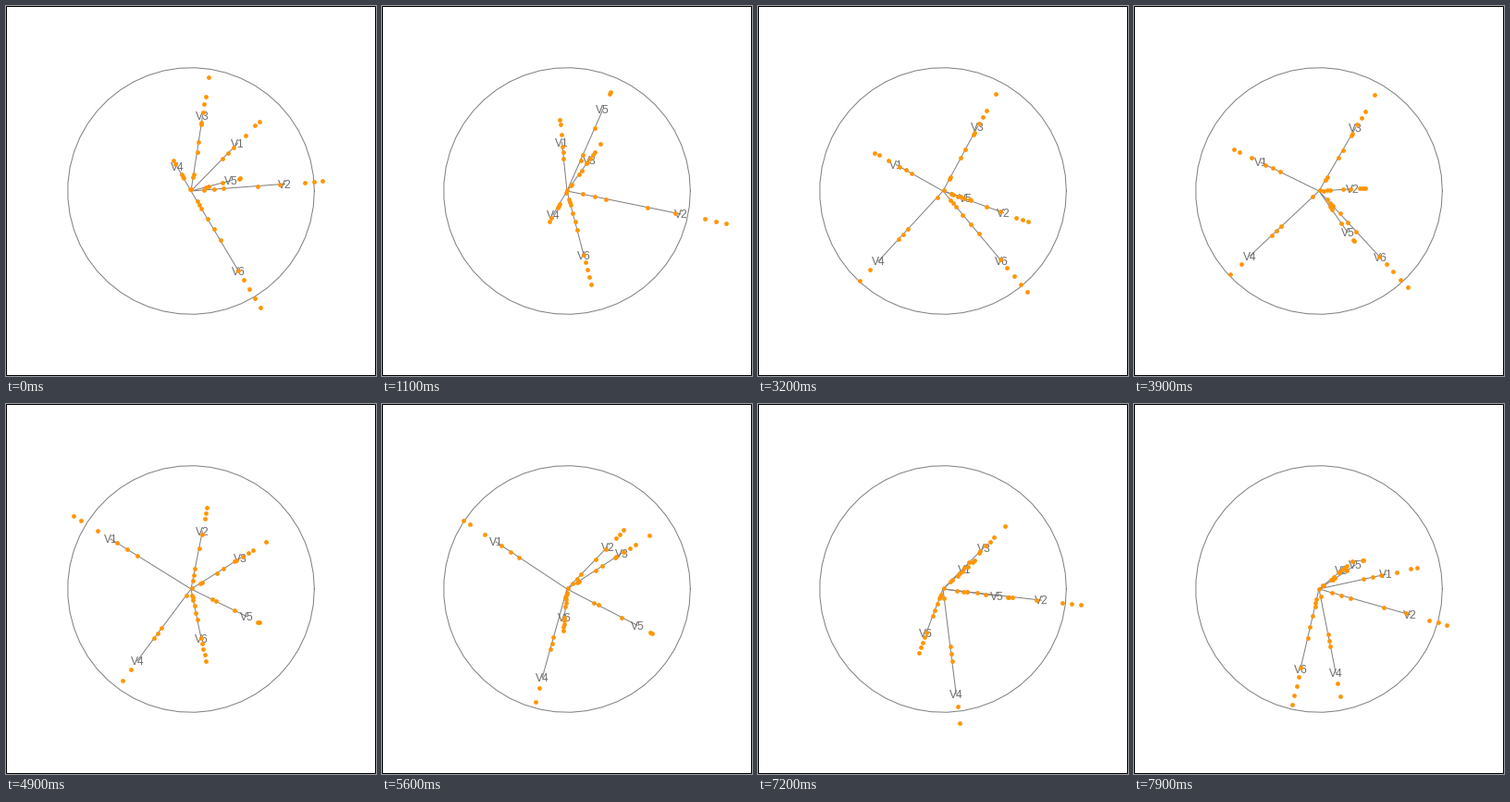
A matplotlib script for the animation above (8 s loop, 400 px wide and 400 px high).

```python
import matplotlib.pyplot as plt
import numpy as np
from matplotlib.animation import FuncAnimation
from matplotlib.patches import Rectangle

SIZE, MID, UNIT = 400, 200, 400 / 3
FRAMES, STEP_MS = 80, 100
GREY, ORANGE = "#7f7f7f", "#ff9505"

# Data along each variable, as evenly spaced runs.
VALUES = [
    np.r_[0.67:0.92:3j, 1.16, 1.37:1.46:2j],
    np.r_[0.14:0.345:3j, 0.71:0.95:2j, 1.213:1.4:3j],
    np.r_[0.02, 0.18:0.22:2j, 0.52:0.645:2j, 0.88:0.908:2j, 1.042:1.252:3j, 1.512],
    np.r_[0.09, 0.545:0.685:3j, 1.123:1.28:2j],
    np.r_[0.38:0.445:2j, 0.777, 1.192:1.215:2j],
    np.r_[0.13:0.22:3j, 0.34:0.61:3j, 0.985:1.445:5j],
]

# The tour turns at these poses: step, then the six axis tips from the centre.
TURNS = [
    (0, "50,-51 101,-7 12,-81 -15,-26 43,-11 52,87"),
    (17, "-33,-37 118,30 30,4 -14,49 35,-108 -7,36"),
    (36, "-50,-19 42,16 35,-77 -78,66 18,45 77,71"),
    (50.5, "-87,-55 9,-71 55,-28 -55,78 63,26 1,49"),
    (65, "-30,-22 94,-7 56,-60 7,111 67,39 -13,-2"),
    (79, "72,-16 98,28 24,-20 18,91 39,-26 -20,87"),
]


def polar(m):
    """Nearest matrix with orthonormal columns."""
    u, _, vt = np.linalg.svd(m, full_matrices=False)
    return u @ vt


def pose(tips):
    return polar(np.array([p.split(",") for p in tips.split()], float))


def geodesic(a, b, s):
    """Basis at share s of the shortest turn from plane a to plane b."""
    u, c, vt = np.linalg.svd(a.T @ b)
    tau = np.arccos(np.clip(c, -1, 1 - 1e-9))
    g = (np.sin((1 - s) * tau) * (a @ u) + np.sin(s * tau) * (b @ vt.T)) / np.sin(tau)
    return g @ polar((1 - s) * u.T + s * vt)


times, poses = zip(*[(t, pose(tips)) for t, tips in TURNS])


def tips_at(t):
    i = max(np.searchsorted(times, t) - 1, 0)
    s = (t - times[i]) / (times[i + 1] - times[i])
    return MID + UNIT * geodesic(poses[i], poses[i + 1], s)


fig = plt.figure(figsize=(4, 4), dpi=100, facecolor="white")
ax = fig.add_axes([0, 0, 1, 1])
ax.set(xlim=(0, SIZE), ylim=(SIZE, 0))
ax.axis("off")

PX = 72 / fig.dpi
theta = np.linspace(0, 2 * np.pi, 50)
ax.plot(MID + UNIT * np.cos(theta), MID + UNIT * np.sin(theta), color=GREY, lw=PX)
ax.add_patch(Rectangle((0.5, 0.5), SIZE - 1, SIZE - 1, fill=False, ec="black",
                       lw=PX, snap=False))

axes = [ax.plot([], [], color=GREY, lw=PX, snap=False)[0] for _ in VALUES]
labels = [ax.text(0, 0, f"V{i + 1}", color="#6c6c6c", ha="center", va="baseline",
                  family="Liberation Sans", size=12 * PX, zorder=3)
          for i in range(len(VALUES))]
dots, = ax.plot([], [], "o", color=ORANGE, ms=4.8 * PX, mew=0, zorder=4, snap=False)


def draw(t):
    tips = tips_at(t)
    for (x, y), line, label in zip(tips, axes, labels):
        line.set_data([MID, x], [MID, y])
        label.set_position((x, y + 4.3))
    pts = np.vstack([MID + np.outer(v, tip - MID) for v, tip in zip(VALUES, tips)])
    dots.set_data(pts[:, 0], pts[:, 1])
    return [*axes, *labels, dots]


anim = FuncAnimation(fig, draw, frames=FRAMES, interval=STEP_MS, repeat=True,
                     repeat_delay=0, blit=False)
plt.show()
```
